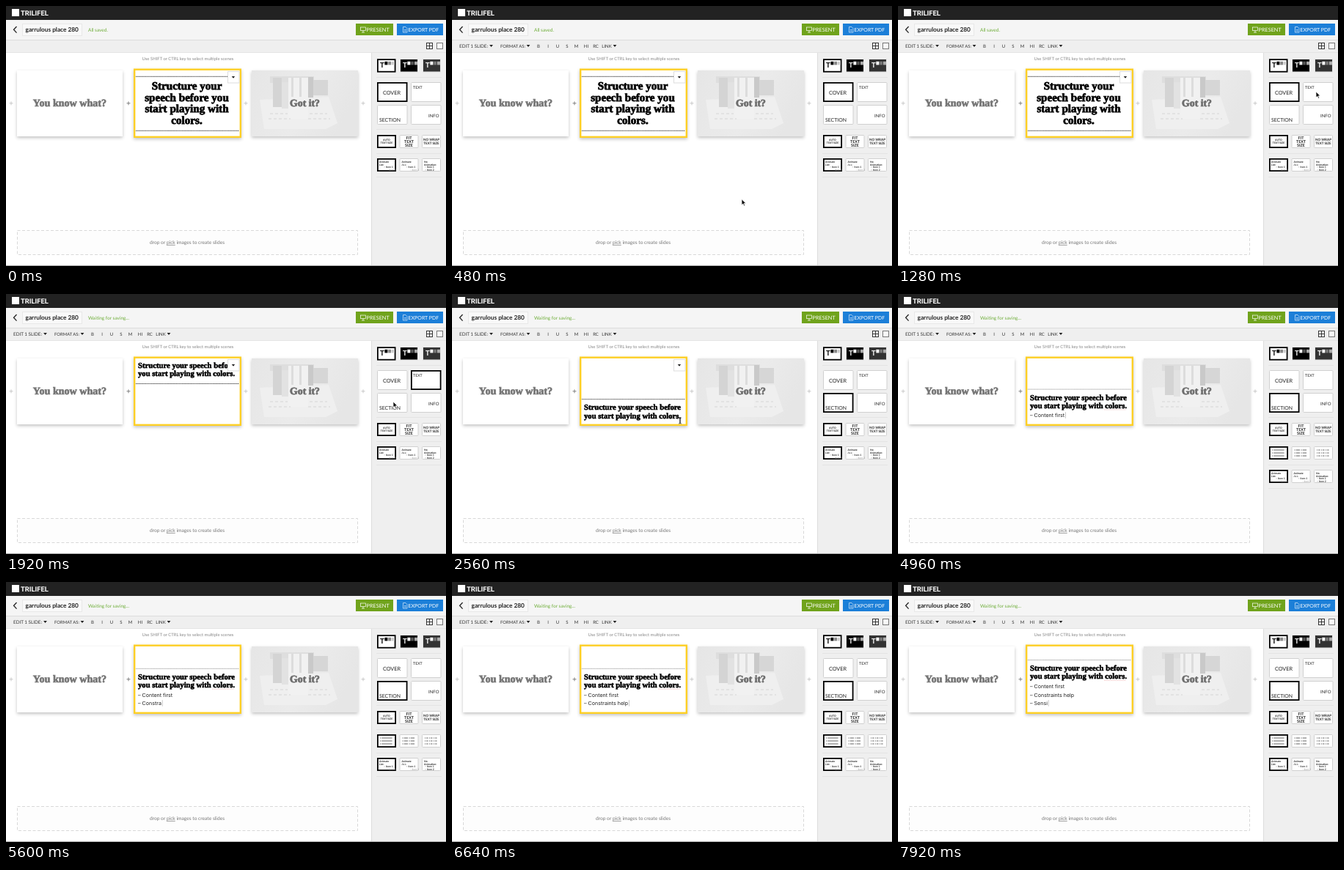
An HTML page for the animation above (8 s loop, 600x355 px).

```html
<!DOCTYPE html>
<html lang="en">
<head>
<meta charset="utf-8">
<title>Slide editor</title>
<style>
html, body { margin: 0; height: 100%; overflow: hidden; background: #fff; }
svg { display: block; width: 100vw; height: 100vh; }
text { font-family: Lato, sans-serif; white-space: pre; text-rendering: geometricPrecision; }
.serif { font-family: "Liberation Serif", serif; font-weight: 700; stroke-width: .05em; }
.item { font-family: Inter, sans-serif; }
.brand { font-family: Roboto, sans-serif; font-weight: 700; }
</style>
</head>
<body>
<svg id="stage" viewBox="0 0 600 355">
  <defs>
    <filter id="shadow" x="-10%" y="-10%" width="120%" height="130%">
      <feDropShadow dx="0" dy="2" stdDeviation="2" flood-opacity=".24"/>
    </filter>
    <linearGradient id="paper" x1="0" y1="0" x2="1" y2=".3">
      <stop offset="0" stop-color="#e6e6e6"/>
      <stop offset=".6" stop-color="#ebebeb"/>
      <stop offset="1" stop-color="#e6e6e6"/>
    </linearGradient>
  </defs>
  <g id="base"></g>
  <g id="live"></g>
</svg>
<script>
const LOOP = 8000, STEP = 80;
const YELLOW = '#fdcf25';
const layer = id => document.getElementById(id);

const rect = (x, y, w, h, fill, more = '') =>
  `<rect x="${x}" y="${y}" width="${w}" height="${h}" fill="${fill}" ${more}/>`;
const path = (d, stroke, width = 1, more = '') =>
  `<path d="${d}" fill="none" stroke="${stroke}" stroke-width="${width}" ${more}/>`;
const text = (x, y, s, size, fill = '#222', more = '') =>
  `<text x="${x}" y="${y}" font-size="${size}" fill="${fill}" ${more}>${s}</text>`;
const middle = 'text-anchor="middle"', bold = 'font-weight="700"';
const serif = (x, y, s, size, fill = '#000', more = '') =>
  text(x, y, s, size, fill, `class="serif" stroke="${fill}" ${more}`);
const triangle = (x, y, r = 2.4) =>
  `<path d="M${x - r} ${y}h${2 * r}l${-r} ${r * 1.2}z" fill="#222"/>`;
const dots = (y, color) => path(`M177 ${y}H318`, color, .9, 'stroke-dasharray="1.4 .7"');

// A sidebar button; the chosen one has a heavy black frame.
const button = (x, y, w, h, on) => on
  ? rect(x + .9, y + .9, w - 1.8, h - 1.8, '#fff', 'stroke="#000" stroke-width="1.8"')
  : rect(x + .5, y + .5, w - 1, h - 1, '#fff', 'stroke="#d0d0d0" rx="1"');

function photo() {
  return rect(335, 88, 145, 90, 'url(#paper)', 'filter="url(#shadow)"') +
    '<path d="M346 128L440 124L452 160L436 168H352Z" fill="#efefef"/>' +
    rect(360, 96, 60, 9, '#dedede') +
    rect(364, 98, 12, 40, '#d4d4d4') +
    rect(376, 104, 9, 36, '#e2e2e2') +
    rect(385, 98, 27, 56, '#f1f1f1') +
    rect(389, 98, 3, 26, '#dcdcdc') + rect(400, 98, 3, 26, '#dcdcdc') +
    rect(412, 97, 7, 28, '#c9c9c9') +
    rect(419, 101, 20, 21, '#d6d6d6') +
    path('M360 147H384M358 154H388M414 147H438M412 154H442', '#dedede', 1.5, 'stroke-dasharray="4 3"');
}

function drawBase() {
  let s = rect(0, 0, 600, 355, '#fff') +
    rect(0, 0, 600, 19, '#222') + rect(8, 4, 10, 10, '#fff') +
    text(20, 12.8, 'TRILIFEL', 9.4, '#fff', 'class="brand"') +
    rect(0, 19, 600, 27, '#f5f5f5') + rect(0, 46, 600, 18, '#efefef') +
    path('M0 46.5H600', '#ddd') + path('M0 63.5H600', '#e4e4e4') +
    path('M14.5 28L10.5 32.3L14.5 36.6', '#222', 1.3) +
    rect(22.5, 24.5, 81, 16, '#f9f9f9', 'stroke="#e8e8e8"') +
    text(26.5, 35.2, 'garrulous place 280', 8.3, '#222', bold);

  s += rect(477, 24, 51, 16, '#70a31c') + rect(533, 24, 63, 16, '#1c7fd8') +
    rect(483.5, 29, 7, 4.5, 'none', 'stroke="#fff" stroke-width=".7"') +
    path('M487 33.5V36M485 36H489', '#fff', .7) +
    text(491.5, 35, 'PRESENT', 7.3, '#fff') +
    path('M541.5 28.5H545L547 30.5V36H541.5ZM543 32.5H545.5M543 34.2H545.5', '#fff', .6) +
    text(548.5, 35, 'EXPORT PDF', 7, '#fff');

  s += rect(573.5, 50.5, 8, 8, '#fff', 'stroke="#333"') +
    path('M577.5 50V59M573 54.5H582', '#333') +
    rect(587.5, 50.5, 8, 8, '#f8f8f8', 'stroke="#777"');

  s += text(248, 74, 'Use SHIFT or CTRL key to select multiple scenes', 5.9, '#888', middle);
  for (const x of [7, 167, 327, 487])
    s += path(`M${x - 2.5} 132.8h5M${x} 130.3v5`, x === 167 ? '#777' : '#c4c4c4', .9);
  s += rect(15, 88, 144, 90, '#fff', 'filter="url(#shadow)"') +
    serif(87, 137.3, 'You know what?', 14.1, '#757575', middle) + photo() +
    serif(407.5, 137.3, 'Got it?', 13.8, '#6c6c6c', middle) +
    rect(175.2, 86.7, 144.6, 92.1, '#fff', `stroke="${YELLOW}" stroke-width="2.4" filter="url(#shadow)"`);

  s += rect(15.5, 306.5, 464, 33, '#fdfdfd', 'stroke="#d8d8d8" stroke-dasharray="4 2.5"') +
    text(247, 325.3, 'drop or <tspan text-decoration="underline">pick</tspan> images to create slides',
      6.65, '#777', middle);

  s += rect(498, 64, 102, 291, '#efefef') + path('M498.5 64V355', '#ddd');
  const themes = [['#fff', '#000', '#888', '#ccc'], ['#000', '#fff', '#555', '#aaa'], ['#333', '#fff', '#777', '#aaa']];
  themes.forEach(([back, ink, mid, pale], i) => {
    const x = 506 + i * 31;
    s += (i ? rect(x + .5, 72.5, 24, 17.5, back, 'stroke="#e2e2e2"') : button(x, 72.2, 25.5, 18.4, true)) +
      text(x + 4, 84, 'T', 9.6, ink, bold) +
      [ink, mid, pale].map((c, k) => rect(x + 10.4 + k * 4.8, 75.8, 4, 4.6, c)).join('');
  });
  for (const y of [97.5, 168.5, 201.5, 233.5]) s += path(`M505 ${y}H594`, '#e4e4e4');

  const sizes = [['AUTO', 'TEXT SIZE'], ['FIT', 'TEXT', 'SIZE'], ['NO WRAP', 'TEXT SIZE']];
  sizes.forEach((lines, i) => {
    const x = 506 + i * 30.5, size = [3.5, 5.4, 4.6][i], gap = [4, 5.3, 5.3][i];
    s += button(x, 176, 26, 18, !i);
    lines.forEach((line, k) => {
      s += text(x + 13, 185.2 + size * .35 + (k - (lines.length - 1) / 2) * gap, line, size, '#222', `${middle} ${bold}`);
    });
  });
  return s + path('M0 354.5H600', '#a8a8a8');
}

function sidebar(layout, list) {
  let s = button(506, 104, 41.5, 27, layout === 'COVER') + button(552, 104, 41.5, 27, layout === 'TEXT') +
    button(506, 135, 41.5, 27, layout === 'SECTION') + button(552, 135, 41.5, 27) +
    text(526, 120.8, 'COVER', 7.3, '#222', middle) + text(555, 113.4, 'TEXT', 5.3) +
    text(509, 157.8, 'SECTION', 6.9) + text(590.5, 151.5, 'INFO', 6, '#222', 'text-anchor="end"');
  const boxes = [506, 536.5, 567];
  if (list) boxes.forEach((x, i) => {
    s += button(x, 208, 26, 18, !i);
    const cols = i + 1, w = 18 / cols;
    for (let c = 0; c < cols; c++)
      for (const y of [213, 217, 221])
        s += path(`M${x + 4 + c * w} ${y}h1.2m1 0h${w - 3.6}`, '#222', .7);
  });
  const top = list ? 240 : 208;
  if (list) s += path('M505 265.5H594', '#e4e4e4');
  [['Animate', 'List:'], ['Animate', 'ALL:'], ['No', 'Animation:']].forEach(([a, b], i) => {
    const x = boxes[i], row = (k, dx, str, c, more) => text(x + dx, top + 6 + k * 3.6, str, 3.5, c, more);
    s += button(x, top, 26, 18, !i) + row(0, 3, a, '#222', bold) + row(1, 3, b, '#222', i === 1 ? '' : bold) +
      row(2, i === 2 ? 4 : 9, '– Item 1', '#333', bold) +
      row(3, [13, 14, 4][i], '– Item 2', i === 2 ? '#333' : '#999', i === 2 ? bold : '');
  });
  return s;
}

function toolbar() {
  let s = text(10, 56.8, 'EDIT 1 SLIDE:', 6.3, '#333') + text(66, 56.8, 'FORMAT AS:', 5.9, '#333');
  [['B', 118], ['I', 131], ['U', 144], ['S', 157], ['M', 169.5], ['HI', 183], ['RC', 196], ['LINK', 211]]
    .forEach(([label, x]) => s += text(x, 56.8, label, 6, '#333', middle));
  return s + [53.5, 104, 222].map(x => triangle(x, 53)).join('');
}

// Each item opens with a dash; its runs are typed one key per step.
const items = [
  { open: 3120, dash: 3360, runs: [[3680, 'Con'], [4000, 'tent f'], [4640, 'ir'], [4880, 'st']] },
  { open: 5040, dash: 5040, runs: [[5120, 'Constraints'], [6160, ' h'], [6400, 'e'], [6560, 'lp']] },
  { open: 7120, dash: 7120, runs: [[7600, 'Sen'], [7760, 's'], [7920, 'i']] }
];
const typed = (item, t) => t < item.dash ? '' : '– ' + item.runs
  .map(([start, s]) => s.slice(0, Math.max(0, Math.floor((t - start) / STEP) + 1))).join('');
const CARET = '<tspan fill="#777" stroke="none" font-weight="300">|</tspan>';

function slide(t, layout) {
  if (layout === 'COVER')
    return dots(96.3, '#222') + dots(170.3, '#222') +
      ['Structure your', 'speech before you', 'start playing with', 'colors.']
        .map((line, i) => serif(246.5, 114.4 + i * 15.4, line, 15.1, '#000', middle)).join('');
  const open = items.filter(item => t >= item.open), n = open.length;
  const last = layout === 'TEXT' ? 112 : n ? 167.7 - 11.8 * n : 169.5;
  const editing = t >= 2800;
  let s = dots(layout === 'TEXT' ? 122.5 : last - 25.8, n ? '#999' : '#333') +
    serif(180, last - 11.2, 'Structure your speech before', 10.7) +
    serif(180, last, 'you start playing with colors.' + (editing && !n ? CARET : ''), 10.65);
  if (editing) s += path(`M281 ${last + 2}h29`, '#e99', .7, 'stroke-dasharray="1 1"');
  open.forEach((item, i) => {
    s += text(180, 168.4 - 11.8 * (n - 1 - i), typed(item, t) + (i === n - 1 ? CARET : ''), 7.1, '#222', 'class="item"');
  });
  return s;
}

// Pointer trips: start, end, from, bend, to.
const trips = [
  [0, 960, [210, 138], [400, 400], [570, 117]],
  [1440, 1920, [570, 117], [562, 142], [528, 147]],
  [2240, 2560, [528, 147], [420, 310], [311, 173]]
];
function pointer(t) {
  if (t >= 3200) return '';
  const [start, end, a, b, c] = trips.filter(trip => t >= trip[0]).pop();
  const p = Math.min(1, (t - start) / (end - start)), u = p * p * (3 - 2 * p);
  const [x, y] = a.map((v, i) => (1 - u) ** 2 * v + 2 * u * (1 - u) * b[i] + u * u * c[i]);
  const beam = x > 174 && x < 321 && y > 85 && y < 180;
  const shape = beam
    ? path('M-1.8 -4Q0 -4 0 -3V3Q0 4 -1.8 4M1.8 -4Q0 -4 0 -3V3Q0 4 1.8 4', '#222', .9)
    : '<path d="M0 0V8L1.9 6.3L3.2 9.2L4.5 8.6L3.2 5.8H5.8Z" fill="#111" stroke="#fff" stroke-width=".7"/>';
  return `<g transform="translate(${x} ${y})">${shape}</g>`;
}

function drawLive(t) {
  const layout = t < 1360 ? 'COVER' : t < 2000 ? 'TEXT' : 'SECTION';
  const saved = t < 1360 || (t >= 2720 && t < 3200);
  let s = text(112, 34.5, saved ? 'All saved.' : 'Waiting for saving...', 6.5, '#6fae3a') +
    sidebar(layout, t >= 3360) + slide(t, layout);
  if (t >= 160) s += toolbar();
  if (t < 3200) s += rect(302.5, 89.5, 15.5, 15.5, '#fff', 'stroke="#ddd"') + triangle(310, 96, 2.2);
  return s + pointer(t);
}

layer('base').innerHTML = drawBase();
const begin = performance.now();
let shown = -1;
function tick() {
  const t = Math.floor((performance.now() - begin) % LOOP / STEP) * STEP;
  if (t !== shown) layer('live').innerHTML = drawLive(shown = t);
  requestAnimationFrame(tick);
}
tick();
</script>
</body>
</html>
```
